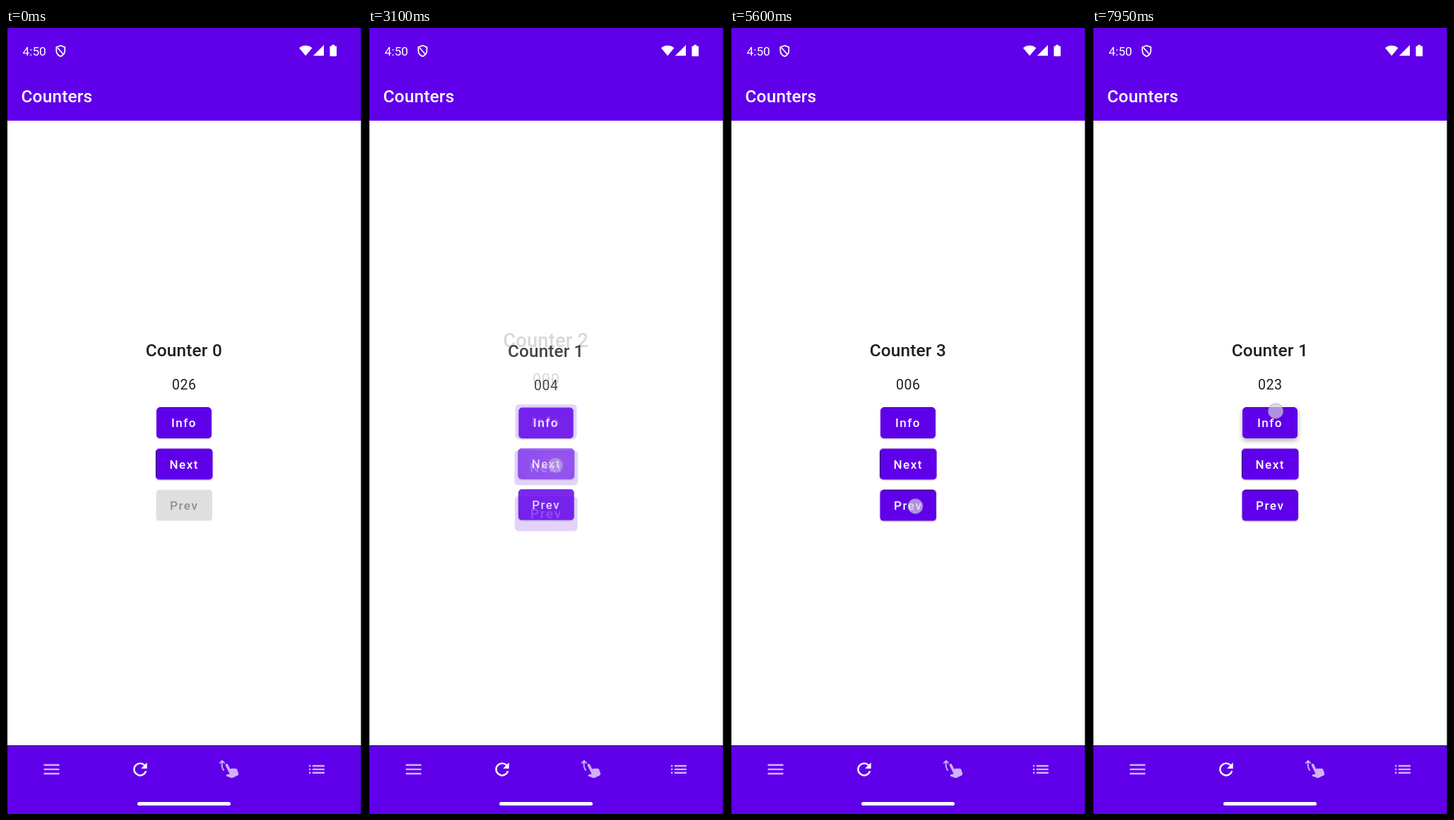
An HTML page for the animation above (8 s loop, 504 by 1111 pixels).

```html
<!DOCTYPE html>
<html lang="en">
<head>
<meta charset="utf-8">
<title>Counters</title>
<style>
html, body { margin: 0; height: 100%; overflow: hidden; background: #000; }
svg { display: block; }
text { font: 500 24.4px Roboto, sans-serif; letter-spacing: .18px; }
.middle { text-anchor: middle; fill: #1f1f1f; }
.count { font-size: 19.5px; font-weight: 400; letter-spacing: .6px; }
.label { font-size: 17.04px; letter-spacing: 1.52px; }
</style>
</head>
<body>
<svg width="504" height="1111" viewBox="0 0 504 1111">
  <defs>
    <radialGradient id="ripple">
      <stop offset="0" stop-color="#fff" stop-opacity=".3"/>
      <stop offset=".5" stop-color="#fff" stop-opacity=".22"/>
      <stop offset="1" stop-color="#fff" stop-opacity="0"/>
    </radialGradient>
  </defs>
  <path fill="#fff" d="M2 131h500.5v883H2z"/>
  <path fill="#6000ea" d="M2 0h500.5v131H2zM2 1015h500.5v96H2z"/>

  <g fill="#fff">
    <text x="23.5" y="38.5" style="font-size:17.3px;font-weight:400;letter-spacing:0">4:50</text>
    <text x="21.5" y="105">Counters</text>
    <path d="M77.3 24.8l6 2.3v5c0 4-2.600 6.800-6 8c-3.400-1.200-6-4-6-8v-5zM73 28l8.500 9.500" fill="none" stroke="#fff" stroke-width="1.7"/>
    <path d="M415 28.300a14 14 0 0 1 18.400 0L424.200 39.300zM450 24v15.200h-15.200z"/>
    <path d="M461.300 23.800h3.800v1.700h2q1 0 1 1v12.400q0 1-1 1h-7.600q-1 0-1-1v-12.400q0-1 1-1h1.800z"/>
    <rect x="186" y="1094" width="132" height="5" rx="2.500"/>
    <path transform="translate(175.300 1033.300) scale(1.217)" d="M17.650 6.350A7.960 7.960 0 0 0 12 4a8 8 0 1 0 7.730 10h-2.080A6 6 0 1 1 12 6c1.660 0 3.140.69 4.220 1.780L13 11h7V4z"/>
  </g>
  <g fill="#fff" opacity=".7">
    <path transform="translate(49.900 1033.300) scale(1.217)" d="M3 18h18v-2H3zm0-5h18v-2H3zm0-7v2h18V6z"/>
    <path transform="translate(300.500 1033.300) scale(1.217)" d="M2.060 5.560L1 4.500 4.500 1 8 4.500 6.940 5.560 5.320 3.940C5.110 4.760 5 5.620 5 6.500c0 2.420.82 4.650 2.200 6.430L6.130 14C4.490 11.950 3.500 9.340 3.500 6.500c0-.92.1-1.820.3-2.680zM13.850 11.620l-2.680-5.370c-.37-.74-1.270-1.040-2.010-.67-.75.38-1.050 1.280-.68 2.020l4.810 9.600-3.240.8c-.33.09-.59.33-.7.66L9 19.780l6.190 2.250c.5.17 1.280.02 1.750-.22l5.510-2.750c.89-.45 1.320-1.480 1-2.420l-1.430-4.270c-.27-.82-1.040-1.370-1.900-1.370h-4.560c-.31 0-.62.07-.89.21z"/>
    <path transform="translate(425.300 1033.300) scale(1.217)" d="M3 13h2v-2H3zm0 4h2v-2H3zm0-8h2V7H3zm4 4h14v-2H7zm0 4h14v-2H7zM7 7v2h14V7z"/>
  </g>
  <g id="view"></g>
</svg>
<script>
const LOOP = 8000, STEP = 50, TICK = 252.5, SETTLE = 285;
const ZERO = [-6631, 1955, 2975, 4036];   // when each counter stood at 000
const BUTTONS = [
  { label: "Info", x: 213, y: 536.2, w: 78 },
  { label: "Next", x: 212, y: 594.5, w: 80.5 },
  { label: "Prev", x: 212.5, y: 652.8, w: 79.5 }
];
const HEIGHT = 43.8;
// screen = where the tap happens, to = screen it opens at time nav
const TAPS = [
  { screen: 0, to: 1, button: 1, x: 265.5, y: 609, down: 1845, ripple: 1865, nav: 2045 },
  { screen: 1, to: 2, button: 1, x: 265.5, y: 618, down: 2880, ripple: 2900, nav: 3063 },
  { screen: 2, to: 3, button: 1, x: 265.5, y: 617, down: 4010, ripple: 4050, nav: 4160 },
  { screen: 3, to: 2, button: 2, x: 262.5, y: 676, down: 5590, ripple: 5640, nav: 5750 },
  { screen: 2, to: 1, button: 2, x: 262.5, y: 676, down: 6345, ripple: 6430, nav: 6515 },
  { screen: 1, to: 1, button: 0, x: 260, y: 541.5, down: 7880, ripple: 7960, nav: LOOP }
];
const view = document.getElementById("view");
const clamp = v => Math.max(0, Math.min(1, v));
const mix = (a, b, k) => a + (b - a) * k;

// critically damped spring, stiffness 400
const spring = ms => 1 - (1 + ms / 50) * Math.exp(-ms / 50);

function button(b, t, tap, disabled, settled) {
  const press = tap && t < tap.nav ? clamp((t - tap.down - 15) / 70) : 0;
  const shadow = `drop-shadow(0 ${mix(1.7, 4.5, press)}px ${mix(1.3, 4.5, press)}px rgba(0,0,0,${mix(.28, .36, press)}))`;
  let out = `<rect x="${b.x}" y="${b.y}" width="${b.w}" height="${HEIGHT}" rx="4.9"
    fill="${disabled ? "#dfdfdf" : "#6000ea"}" ${disabled ? "" : `style="filter:${shadow}"`}/>`;
  if (settled && !disabled) {
    const edge = b.label === "Next" ? `M${b.x + .5} ${b.y + 4}v${HEIGHT - 8}` : `M${b.x + 4} ${b.y + .4}h${b.w - 8}`;
    out += `<path d="${edge}" stroke="#20004e"/>`;
  }
  if (tap && t > tap.ripple) {
    const r = 20 + 110 * ((t - tap.ripple) / 200) ** 3;
    out += `<svg x="${b.x}" y="${b.y}" width="${b.w}" height="${HEIGHT}">
      <circle cx="${tap.x - b.x}" cy="${tap.y - b.y}" r="${Math.min(r, 160)}" fill="url(#ripple)"/></svg>`;
  }
  return out + `<text class="middle label" x="${b.x + b.w / 2}" y="${b.y + 28}"
    style="fill:${disabled ? "#8f8f8f" : "#fff"}">${b.label}</text>`;
}

function screen(n, t, scale = 1, alpha = 1) {
  const count = Math.max(0, Math.floor((t - ZERO[n]) / TICK));
  const tap = TAPS.find(p => p.screen === n && t >= p.down && t < p.nav + SETTLE);
  const buttons = BUTTONS.map((b, i) =>
    button(b, t, tap && tap.button === i ? tap : null, n === 0 && i === 2, scale === 1));
  return `<g opacity="${alpha}" transform="translate(252 573) scale(${scale}) translate(-252 -573)">
    <text class="middle" x="251.800" y="464">Counter ${n}</text>
    <text class="middle count" x="252.300" y="511.300">${String(count).padStart(3, "0")}</text>
    ${buttons.join("")}</g>`;
}

function touch(t) {
  const tap = TAPS.find(p => t >= p.down && t < p.nav + 50);
  return tap ? `<circle cx="${tap.x}" cy="${tap.y}" r="10.700" fill="rgba(212,206,222,.7)"
    stroke="rgba(120,110,140,.45)" opacity="${t < tap.nav ? 1 : .6}"/>` : "";
}

function draw(t) {
  const last = TAPS.filter(p => p.nav <= t).pop();
  if (!last || t - last.nav >= SETTLE) return screen(last ? last.to : 0, t) + touch(t);
  const p = spring(t - last.nav);
  const push = last.to > last.screen, near = 1.14, far = .95;
  return screen(last.screen, t, mix(1, push ? far : near, p), 1 - p)
    + screen(last.to, t, mix(push ? near : far, 1, p), p) + touch(t);
}

const start = performance.now();
let shown = -1;
function frame() {
  const t = Math.floor((performance.now() - start) % LOOP / STEP) * STEP;
  if (t !== shown) view.innerHTML = draw(shown = t);
  requestAnimationFrame(frame);
}
frame();
</script>
</body>
</html>
```
